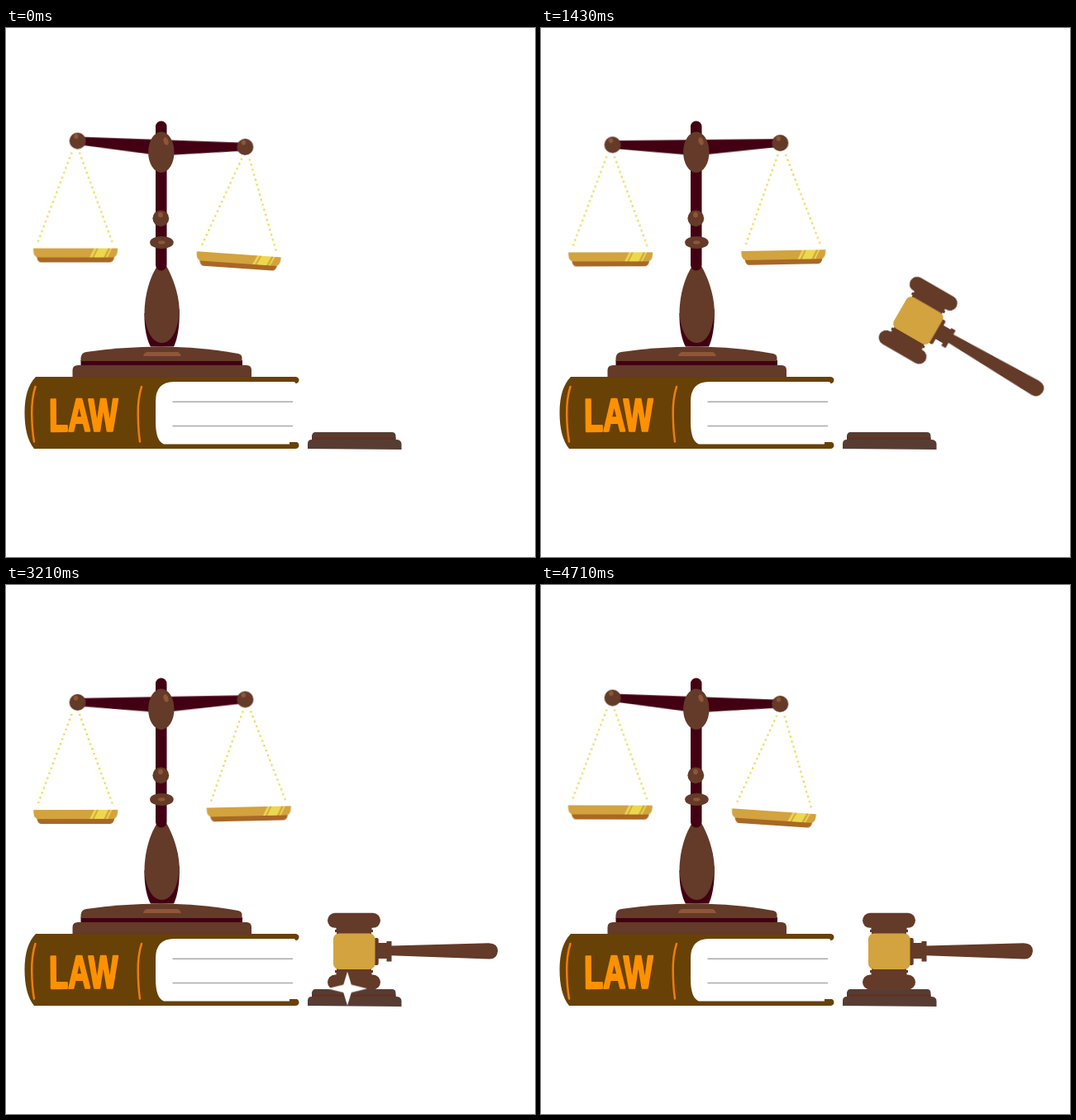
Write an HTML page without scripts that moves like this. It is 640 px wide and 640 px high and loops after 4780 ms.

```html
<!DOCTYPE html>
<html lang="en">
<head>
<meta charset="utf-8">
<title>Scales and gavel</title>
<style>
  html, body { margin: 0; width: 100%; height: 100%; overflow: hidden; background: #fff; }
  svg { display: block; width: 100%; height: 100%; }

  .maroon { fill: #420012; }
  .brown { fill: #643a28; }
  .shine { fill: #8f5638; }
  .gold { fill: #d2a33e; }
  .bronze { fill: #a96826; }
  .glint { fill: #ecd84e; }
  .leather { fill: #684106; }
  .slab { fill: #573c33; }
  .string { fill: none; stroke: #ecd84e; stroke-width: 2.6; stroke-linecap: round; stroke-dasharray: 0 6.3; }
  .band { fill: none; stroke: #ee7d0c; stroke-width: 2.5; stroke-linecap: round; }
  .rule { stroke: #aaa; stroke-width: 1.4; }
  .title {
    font: bold 55.5px "Liberation Sans", Arial, sans-serif;
    fill: #ff9100; stroke: #ff9100; stroke-width: 2.4; stroke-linejoin: round;
    vector-effect: non-scaling-stroke;
  }

  .beam, .pan-left, .pan-right, .slide, .swing, .spark { animation: 4780ms linear infinite; }
  .beam { animation-name: tilt; animation-timing-function: cubic-bezier(.364, 0, .636, 1); transform-origin: 188px 140.25px; }
  .pan-left { animation-name: hang-left; }
  .pan-right { animation-name: hang-right; }
  .slide { animation-name: slide; }
  .swing { animation-name: swing; transform-origin: 586px 443px; }
  .spark { animation-name: spark; animation-timing-function: ease-in-out; }

  @keyframes tilt {
    0%, 100% { transform: rotate(2.1deg); }
    50% { transform: rotate(-2.1deg); }
  }
  /* pan angles are relative to the beam */
  @keyframes hang-left {
    0%, 100% { transform: rotate(-2.1deg); }
    19.5% { transform: rotate(-.25deg); }
    40.4% { transform: rotate(1.45deg); }
    50% { transform: rotate(2.05deg); }
    55.2% { transform: rotate(1.95deg); }
    67.2% { transform: rotate(.9deg); }
    85.1% { transform: rotate(-.85deg); }
  }
  @keyframes hang-right {
    0%, 100% { transform: rotate(1.9deg); }
    19.5% { transform: rotate(.3deg); }
    40.4% { transform: rotate(-1.1deg); }
    50% { transform: rotate(-1.2deg); }
    55.2% { transform: rotate(-1.15deg); }
    67.2% { transform: rotate(-.25deg); }
    85.1% { transform: rotate(.75deg); }
  }
  @keyframes slide {
    0% { transform: translate(252px, -131px); animation-timing-function: cubic-bezier(.33, .5, .67, .82); }
    11.92% { transform: translate(90px, -47px); animation-timing-function: cubic-bezier(.333, 1, .667, 1); }
    50%, 100% { transform: none; }
  }
  @keyframes swing {
    0%, 50% { transform: rotate(30deg); animation-timing-function: ease-in; }
    55.2% { transform: rotate(28.2deg); animation-timing-function: cubic-bezier(.5, .15, .8, .8); }
    59.8% { transform: rotate(.3deg); }
    61.3%, 100% { transform: rotate(0deg); }
  }
  @keyframes spark {
    0%, 61% { transform: scale(0); }
    67.2% { transform: scale(1); }
    72.8%, 100% { transform: scale(0); }
  }
</style>
</head>
<body>
<svg viewBox="0 0 640 640" xmlns="http://www.w3.org/2000/svg">
  <defs>
    <g id="pan">
      <path class="string" d="M-7.5 15-49.5 126M2.5 15 43.5 127"/>
      <path class="bronze" d="M-49.5 140H44.5Q43.5 147 39 147H-44.500Q-48.500 147-49.500 140Z"/>
      <path class="gold" d="M-53.600 130H48.400V133Q47.500 141 42.500 141H-47.500Q-53 141-53.600 133Z"/>
      <path class="glint" d="M14.500 141 20 130h3L17.500 141ZM19.500 141 25 130H37L31.500 141ZM34 141 39.500 130h2L36 141Z"/>
    </g>
    <g id="knob">
      <circle class="brown" r="10"/>
      <ellipse class="shine" cx="-2" cy="-5.300" rx="2.700" ry="3"/>
    </g>
  </defs>

  <g id="book">
    <path class="leather" d="M36 422H351Q354.500 423 354.500 426 354 430 350.500 430L349 428H203Q181 428 181 452V476Q181 500 191 503.500H343V501H352Q354.500 502 354.500 505 354 509 350 509H34Q22.500 495 22.500 465 22.500 436 36 422Z"/>
    <path class="band" d="M35.500 434Q31 448 31.200 467T34 500.500M164 434Q159.500 448 159.700 467T162 500.500"/>
    <path class="rule" d="M201.500 452.300H347M201.500 481.500H347"/>
    <text class="title" transform="translate(52.300 487.800) rotate(-.5) scale(.675 1)">LAW</text>
  </g>

  <g id="stand">
    <path class="brown" d="M80.500 422.500V414Q80.500 408 87 408H291Q297 408 297 414V422.500Z"/>
    <path class="maroon" d="M90.500 402H286V408H90.500Z"/>
    <path class="brown" d="M90.500 403V399Q91 393 97 392 140 385.500 188 385.500 240 386 281 394 285.500 395 285.500 399V403Z"/>
    <path class="shine" d="M170 392H208Q211 393.500 212 397H166Q166.500 393.500 170 392Z"/>
    <path class="maroon" d="M167.500 345C167 364 171 379 175 385.500H203C207 377 210.500 362 209.700 340Z"/>
    <path class="brown" d="M183 288C175 300 167.500 321 167.500 346 169 366 177 381 188.500 381 200 381 208.500 366 209.800 341 209 320 201 300 194 288Z"/>
    <rect class="maroon" x="181" y="112.500" width="13.500" height="181" rx="6.700"/>
  </g>

  <g class="beam">
    <path class="maroon" d="M90 135.300H285V145.200L202 153H173L90 145Z"/>
    <g transform="translate(86.600 140.250)">
      <g class="pan-left"><use href="#pan"/></g>
      <use href="#knob"/>
    </g>
    <g transform="translate(289.400 140.250)">
      <g class="pan-right"><use href="#pan" x="4.100"/></g>
      <use href="#knob"/>
    </g>
  </g>

  <g id="ornaments">
    <ellipse class="brown" cx="187.800" cy="150.300" rx="15.700" ry="24.700"/>
    <ellipse class="shine" cx="193.500" cy="137" rx="2.800" ry="4.800" transform="rotate(-18 193.500 137)"/>
    <circle class="brown" cx="187.300" cy="230.300" r="9.900"/>
    <ellipse class="shine" cx="187" cy="226" rx="2.900" ry="3.300"/>
    <ellipse class="brown" cx="188.400" cy="259.400" rx="14.300" ry="7.500"/>
    <ellipse class="shine" cx="188.300" cy="259.400" rx="4.200" ry="2.100"/>
  </g>

  <g id="block">
    <path class="slab" d="M370 497V493Q371 489 374 489H467Q471.500 489 471.500 494V498H370Z"/>
    <path fill="#652f1f" d="M370 495.500H471.500V498.500H370Z"/>
    <path class="slab" d="M365 509V503Q365 498 370 498H473Q478.500 498.500 478.500 503.500V510Z"/>
  </g>

  <g class="slide">
    <g class="swing">
      <g class="brown">
        <rect x="389" y="396.800" width="64" height="18" rx="9"/>
        <rect x="389" y="471.500" width="64" height="18" rx="9"/>
        <path d="M399.500 412H442.500V417H444V420H442V466H444V469H442.500V474H399.500V469H398V466H400V420H398V417H399.500Z"/>
        <rect x="445" y="427" width="5.700" height="33" rx="2"/>
        <rect x="450" y="433" width="11" height="19"/>
        <rect x="460.500" y="431" width="6" height="24.500"/>
        <path d="M466 436.500 584 433.300Q595 433.500 595 443 594 453 584 452.500L466 448.300Z"/>
      </g>
      <rect class="gold" x="396" y="421.500" width="50.500" height="43.500" rx="7"/>
    </g>
  </g>

  <g transform="translate(413 488.300)">
    <path class="spark" fill="#fff" d="M0-20.500 4.800-4.800 24 0 4.800 4.800 0 20.500-4.800 4.800-24 0-4.800-4.800Z"/>
  </g>
</svg>
</body>
</html>
```
